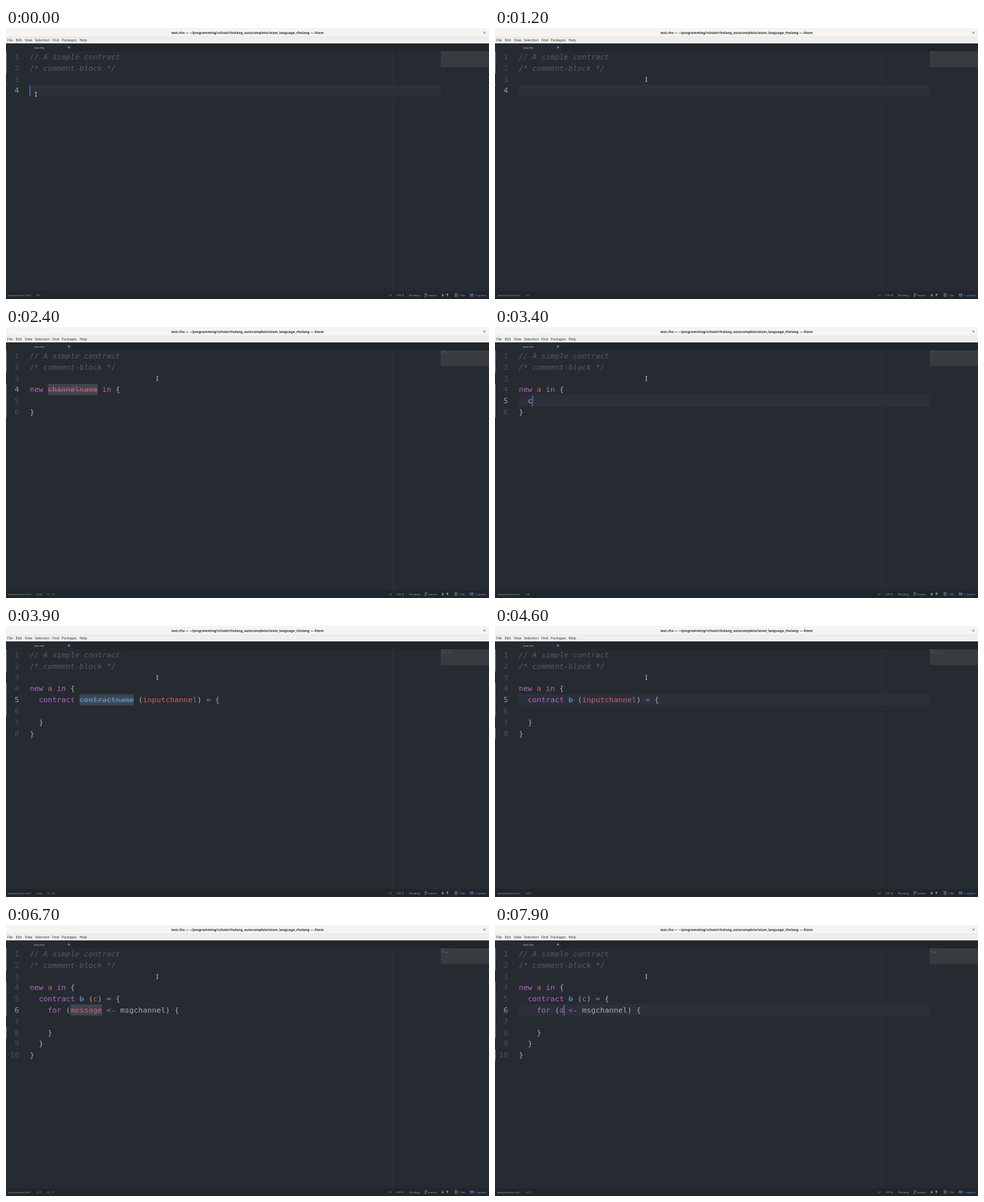
Recreate the animation shown at these times as an HTML page with a canvas. Size 720 by 405 pixels, loop 8 s.

```html
<!DOCTYPE html>
<html lang="en">
<head>
<meta charset="utf-8">
<title>Snippet typing</title>
<style>
  html, body { margin: 0; width: 100%; height: 100%; overflow: hidden; background: #262b31; }
  canvas { display: block; width: 720px; height: 405px; }
</style>
</head>
<body>
<canvas id="stage"></canvas>
<script>
const W = 720, H = 405, LOOP = 8000;
const canvas = document.getElementById('stage');
const ctx = canvas.getContext('2d');
const dpr = window.devicePixelRatio || 1;
canvas.width = W * dpr;
canvas.height = H * dpr;
ctx.scale(dpr, dpr);

const MONO = '"DejaVu Sans Mono", monospace';
const SANS = '"Noto Sans", sans-serif';
const CODE = `11.2px ${MONO}`;
const LEFT = 35.4, TOP = 34.6, ROW = 16.8, CHAR = 6.743;

const INK = {
  comment: '#555b66', keyword: '#b565c9', variable: '#cb626b',
  name: '#5a9dd6', plain: '#a5acb8'
};

const RULES = [
  ['comment', /\/\/.*|\/\*.*\*\//y],
  ['keyword', /\b(?:new|in|contract|for)\b|<-|=/y],
  ['variable', /(?<=new |contract \w+ \(|for \()\w+/y],
  ['name', /(?<=contract )\w+/y],
  ['plain', /\w+|\s+|./y]
];

const HEAD = ['// A simple contract', '/* comment-block */', ''];
const doc = (...lines) => HEAD.concat(lines);
const inNew = (...lines) => doc('new a in {', ...lines, '}');
const inContract = (...lines) => inNew('  contract b (c) = {', ...lines, '  }');

// Each state: start time, lines, caret row, caret column, selected length
const states = [[0, doc(''), 4, 0]];
const add = (...state) => states.push(state);
const type = (word, times, wrap, row, indent) => times.forEach((t, i) => {
  const text = word.slice(0, i + 1);
  add(t, wrap(' '.repeat(indent) + text), row, indent + text.length);
});

type('new', [1500, 1700, 1800], doc, 4, 0);
add(1900, doc('new channelname in {', '', '}'), 4, 15, 11);
add(2800, inNew(''), 4, 5);
add(3000, inNew('  '), 5, 2);
type('cont', [3300, 3500, 3600, 3800], inNew, 5, 2);
add(3900, inNew('  contract contractname (inputchannel) = {', '', '  }'), 5, 23, 12);
const named = inNew('  contract b (inputchannel) = {', '', '  }');
add(4200, named, 5, 12);
add(4800, named, 5, 26, 12);
add(5100, inContract(''), 5, 15);
add(6000, inContract('    '), 6, 4);
type('for', [6100, 6300, 6400], inContract, 6, 4);
add(6700, inContract('    for (message <- msgchannel) {', '', '    }'), 6, 16, 7);
add(7800, inContract('    for (d <- msgchannel) {', '', '    }'), 6, 10);

const caretOff = [[600, 900], [1200, 1500], [4600, 4800], [5600, 6000]];

// Change bars in the gutter: start time, then row ranges
const marks = [
  [0, [1, 2]],
  [2100, [1, 2], [4, 6]],
  [4300, [1, 2], [4, 6], [8, 8]],
  [7900, [1, 2], [4, 8], [10, 10]]
];

const latest = (list, t) => list.filter(item => item[0] <= t).pop();
const rowTop = row => TOP + (row - 1) * ROW;

function box(x, y, w, h, color) {
  ctx.fillStyle = color;
  ctx.fillRect(x, y, w, h);
}

function label(text, x, y, size, color, weight = '', align = 'left') {
  ctx.font = `${weight} ${size}px ${SANS}`;
  ctx.textAlign = align;
  ctx.fillStyle = color;
  ctx.fillText(text, x, y);
  ctx.textAlign = 'left';
}

function line(color, width, ...points) {
  ctx.strokeStyle = color;
  ctx.lineWidth = width;
  ctx.beginPath();
  points.forEach(([x, y], i) => i ? ctx.lineTo(x, y) : ctx.moveTo(x, y));
  ctx.stroke();
}

function dot(x, y, r, color) {
  ctx.fillStyle = color;
  ctx.beginPath();
  ctx.arc(x, y, r, 0, 7);
  ctx.fill();
}

function tokens(text) {
  const out = [];
  for (let at = 0; at < text.length;) {
    for (const [kind, rule] of RULES) {
      rule.lastIndex = at;
      const hit = rule.exec(text);
      if (!hit) continue;
      out.push([kind, hit[0], at]);
      at += hit[0].length;
      break;
    }
  }
  return out;
}

function drawBars() {
  box(0, 0, W, 13.3, '#f5f4f2');
  box(0, 13.3, W, 9.9, '#efeeec');
  box(0, 13, W, .4, '#dddbd8');
  label('test.rho — ~/programming/rchain/rholang_autocomplete/atom_language_rholang — Atom',
    360, 8.6, 5.01, '#35383a', 'bold', 'center');
  line('#444', .7, [711.8, 5.4], [714.6, 8.2]);
  line('#444', .7, [714.6, 5.4], [711.8, 8.2]);
  [['File', 2], ['Edit', 14.5], ['View', 28], ['Selection', 43], ['Find', 69],
    ['Packages', 83], ['Help', 109.5]].forEach(([text, x]) => label(text, x, 20.3, 5.15, '#35383a'));

  box(0, 23.2, W, 11.4, '#21262b');
  box(0, 23.2, 98, 11.4, '#262b31');
  label('test.rho', 42, 30.6, 4.15, '#c9cdd2');
  dot(93.8, 29, 1.5, '#568af2');
}

function drawStatus(row, col, picked) {
  const y = 400.7, gray = '#989ea8', blue = '#6494ed';
  const text = (s, x, color = gray) => label(s, x, y, 4.15, color);
  box(0, 393.7, W, 11.3, '#21262b');
  text('samples/test.rho*', 3, '#9299a3');
  text(`${row}:${col + 1}`, 45.5);
  if (picked) text(`(1, ${picked})`, 61.5);
  text('LF', 571);
  text('UTF-8', 582);
  text('Rholang', 601);
  text('master', 629);
  text('1 file', 675);
  text('1 update', 699, blue);

  line(gray, .6, [625, 397.3], [625, 401.3]);
  line(gray, .6, [625, 400], [627.2, 398.9], [627.2, 397.6]);
  [[625, 397], [625, 401.4], [627.2, 397.3]].forEach(([x, py]) => dot(x, py, .65, gray));
  [[651, 1], [658, -1]].forEach(([x, dir]) => {
    line(gray, 1.1, [x, 399 - 2 * dir], [x, 399 + dir]);
    ctx.fillStyle = gray;
    ctx.beginPath();
    ctx.moveTo(x - 1.8, 399 + .2 * dir);
    ctx.lineTo(x + 1.8, 399 + .2 * dir);
    ctx.lineTo(x, 399 + 2.4 * dir);
    ctx.fill();
  });
  ctx.strokeStyle = gray;
  ctx.lineWidth = .6;
  ctx.strokeRect(669.2, 396.8, 3.2, 4.4);
  line(gray, .6, [669.9, 399], [671.7, 399]);
  line(gray, .6, [670.8, 398.1], [670.8, 399.9]);
  ctx.strokeStyle = blue;
  ctx.strokeRect(692, 397.4, 4.6, 3.4);
  line(blue, .6, [692, 398.3], [694.3, 399], [696.6, 398.3]);
  line(blue, .6, [694.3, 399], [694.3, 400.8]);
}

function drawEditor(t, [, lines, row, col, picked = 0]) {
  box(0, TOP, W, 393.7 - TOP, '#262b31');
  if (!picked) box(LEFT, rowTop(row), 648 - LEFT, ROW, '#2b303a');
  box(576, TOP, .8, 393.7 - TOP, '#31373e');
  box(648, TOP, 72, 23.8, '#383c41');
  if (picked) box(LEFT + (col - picked) * CHAR, rowTop(row), picked * CHAR, ROW, '#3f4550');

  lines.forEach((text, i) => {
    const n = i + 1, base = rowTop(n) + 12.4;
    ctx.font = CODE;
    ctx.textAlign = 'right';
    ctx.fillStyle = n === row ? '#9299a4' : '#4a505d';
    ctx.fillText(n, 19.4, base);
    ctx.textAlign = 'left';
    for (const [kind, word, at] of tokens(text)) {
      const x = LEFT + at * CHAR, width = word.length * CHAR;
      ctx.font = (kind === 'comment' ? 'italic ' : '') + CODE;
      ctx.fillStyle = INK[kind];
      ctx.fillText(word, x, base);
      if (kind === 'name' || word === 'channelname') box(x, base - 3.4, width, .7, INK[kind]);
      if (word.trim()) {
        ctx.globalAlpha = .45;
        box(648.6 + at * .375, 35.1 + i * 1.125, word.length * .375, .65, INK[kind]);
        ctx.globalAlpha = 1;
      }
    }
  });

  for (const [from, to] of latest(marks, t).slice(1))
    box(0, rowTop(from), .9, (to - from + 1) * ROW, '#8d9399');
  if (t < 2100) {
    ctx.fillStyle = '#b84a4c';
    ctx.beginPath();
    ctx.moveTo(0, 83.4);
    ctx.lineTo(1.6, 85);
    ctx.lineTo(0, 86.6);
    ctx.fill();
  }
  if (!picked && !caretOff.some(([a, b]) => t >= a && t < b))
    box(LEFT + col * CHAR - .2, rowTop(row), 1, ROW, '#528bff');
}

function drawPointer(t) {
  const step = Math.max(0, Math.min(5, Math.floor(t / 100) - 5)) / 5;
  const ease = step * step * (3 - 2 * step);
  const x = 44.6 + 181 * ease, y = 99.2 - 22.2 * ease;
  const color = '#d5d8dc';
  line(color, .8, [x, y - 2.8], [x, y + 2.8]);
  for (const end of [-2.9, 2.9]) line(color, .7, [x - 1.5, y + end], [x + 1.5, y + end]);
}

function draw(now) {
  const t = now % LOOP;
  const state = latest(states, t);
  drawEditor(t, state);
  drawBars();
  drawStatus(state[2], state[3], state[4]);
  drawPointer(t);
}

const start = performance.now();
function tick() {
  draw(performance.now() - start);
  requestAnimationFrame(tick);
}
tick();
</script>
</body>
</html>
```
